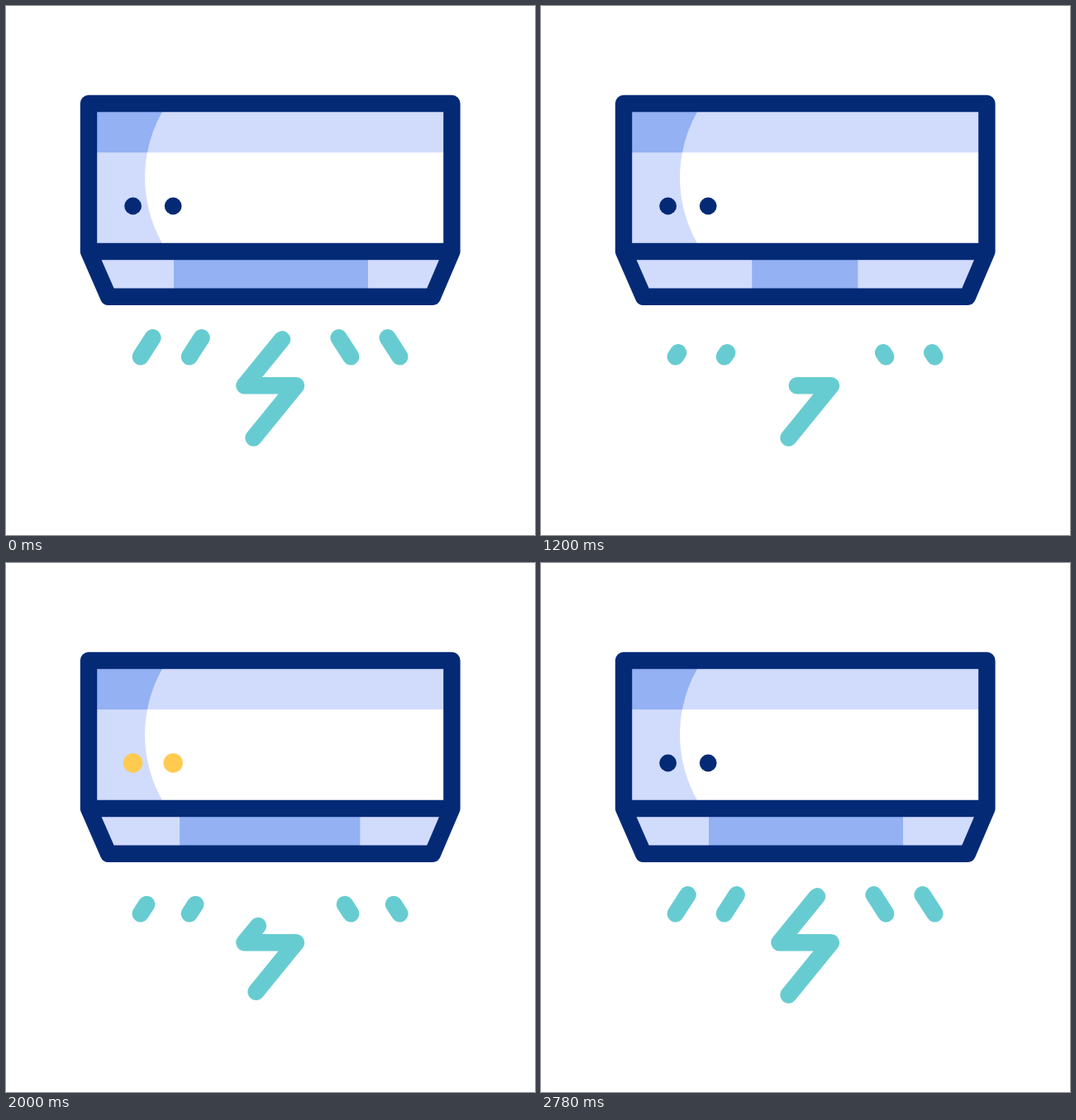
Animation, 640 px wide and 640 px high, one loop 3.6 s. Source, as an HTML page:

```html
<!DOCTYPE html>
<html lang="en">
<head>
<meta charset="utf-8">
<title>Air conditioner</title>
<style>
  html, body { margin: 0; width: 100%; height: 100%; overflow: hidden; background: #fff; }
  svg { display: block; width: 100vw; height: 100vh; }
  .line { fill: none; stroke-width: 20.4; stroke-linecap: round; stroke-linejoin: round; }
  .navy { stroke: #042a76; }
  .teal { stroke: #67ccd1; }
  .pale { fill: #d1dcfd; }
  .blue { fill: #93b1f3; }
</style>
</head>
<body>
<svg viewBox="0 0 640 640">
  <rect class="pale" x="100" y="118" width="439" height="59.3"/>
  <path class="pale" d="M100 118H195L189 128A161 161 0 0 0 189 287L195 297H100Z"/>
  <path class="blue" d="M100 118H195L189 128A161 161 0 0 0 170.9 177.3H100Z"/>
  <path class="pale" d="M100 297L124.5 351.8H515.5L539.5 297Z"/>
  <rect id="vent" class="blue" x="203" y="297" width="235" height="55"/>
  <path class="line navy" d="M100 118H539.4V297L516 351.8H124L100 297ZM100 297H539.4"/>
  <g id="lamps">
    <circle cx="153.6" cy="242" r="10.4"/>
    <circle cx="202.2" cy="242" r="10.4"/>
  </g>
  <g id="air"></g>
</svg>
<script>
const LOOP = 3600, START = 860, BLINK = 283;
const SVG = 'http://www.w3.org/2000/svg';
const $ = id => document.getElementById(id);
const vent = $('vent'), lamps = $('lamps'), air = $('air');

const ease = p => p * p * (3 - 2 * p);

// Eased value between [time, value] keys
function track(keys, t) {
  if (t <= keys[0][0]) return keys[0][1];
  for (let i = 1; i < keys.length; i++) {
    const [t0, a] = keys[i - 1], [t1, b] = keys[i];
    if (t < t1) return a + (b - a) * ease((t - t0) / (t1 - t0));
  }
  return keys[keys.length - 1][1];
}

const squeeze = [[860, 0], [1143, 58], [1440, 0], [1709, 58], [1992, 7], [2275, 58], [2600, 0]];

// Wipe spans: first out, second in, second out, third in
const boltSpans = [[935, 1520], [1437, 2056], [1826, 2415], [2110, 2780]];
const gustSpans = [[860, 1350], [1450, 1930], [1760, 2240], [2255, 2780]];

function stroke(d, spans) {
  const passes = [0, 1, 2].map(() => {
    const path = document.createElementNS(SVG, 'path');
    path.setAttribute('class', 'line teal');
    path.setAttribute('d', d);
    air.append(path);
    return path;
  });
  return { passes, spans, length: passes[0].getTotalLength() };
}

const strokes = [
  stroke('M334 403.3L288.4 459.3H351L299.5 522.5', boltSpans),
  ...[[177.6, -14.8], [236.7, -14.8], [402.5, 14.8], [461.6, 14.8]]
    .map(([x, dx]) => stroke(`M${x} 401.3l${dx} 23`, gustSpans))
];

function trim(path, from, to, length) {
  const shown = to > from;
  path.style.display = shown ? '' : 'none';
  if (!shown) return;
  path.style.strokeDasharray = `${(to - from) * length + (to === 1 ? 0.5 : 0)} ${length * 3}`;
  path.style.strokeDashoffset = -from * length;
}

function draw(t) {
  const d = track(squeeze, t);
  const left = 203 + d, right = 438 - d - Math.min(d, 2.5);
  vent.setAttribute('x', left);
  vent.setAttribute('width', right - left);

  const step = Math.floor((t - START) / BLINK);
  const lit = step >= 0 && step < 6 && step % 2 === 0;
  lamps.setAttribute('fill', lit ? '#fecb50' : '#042a76');
  for (const lamp of lamps.children) lamp.setAttribute('r', lit ? 11.7 : 10.4);

  for (const { passes, spans, length } of strokes) {
    const [out1, in2, out2, in3] = spans.map(([a, b]) => track([[a, 0], [b, 1]], t));
    trim(passes[0], out1, 1, length);
    trim(passes[1], out2, in2, length);
    trim(passes[2], 0, in3, length);
  }
}

function frame() {
  draw(performance.now() % LOOP);
  requestAnimationFrame(frame);
}
frame();
</script>
</body>
</html>
```
